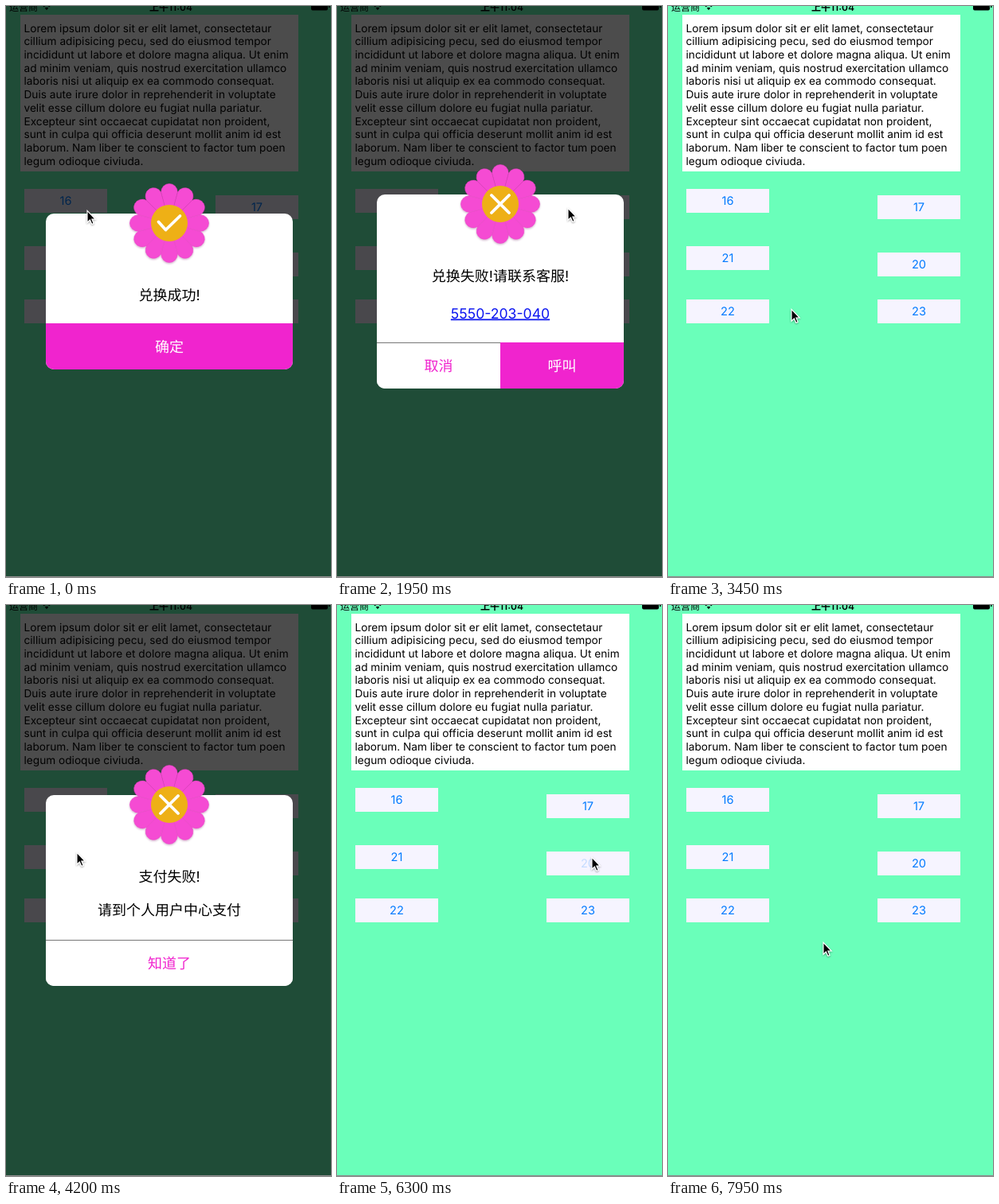
An HTML page that plays this animation: 408x718 px, repeating every 8000 ms.

```html
<!DOCTYPE html>
<html lang="zh-CN">
<head>
<meta charset="utf-8">
<title>弹窗演示</title>
<style>
  html, body { margin: 0; width: 100%; height: 100%; overflow: hidden; background: #6affba; }
  svg { display: block; width: 100vw; height: 100vh; }
  text { font: 18px Inter, "Noto Sans CJK SC", "Noto Sans CJK", sans-serif; text-rendering: geometricPrecision; }
  .mid { text-anchor: middle; }
  #lorem text { font-size: 13.66px; }
  #keys rect { fill: #f6f4ff; }
  #keys text { font-size: 14.6px; fill: #007aff; }
  #keys .tapped text { opacity: .2; }
  #status text { font-size: 12px; }
  #status .clock { font-weight: 600; }
  .dialog { visibility: hidden; }
  .dialog.open { visibility: visible; }
  .solid rect { fill: #f024ce; }
  .solid text { fill: #fff; }
  .plain rect { fill: #fff; }
  .plain text { fill: #f024ce; }
  .plain path { stroke: #777; }
  .pressed rect { filter: brightness(.54); }
  .phone { font-size: 17.6px; fill: #0a14f0; text-decoration: underline; }
</style>
</head>
<body>
<svg viewBox="0 0 408 718" preserveAspectRatio="none">
  <defs>
    <clipPath id="card196"><rect width="310" height="196" rx="10"/></clipPath>
    <clipPath id="card240"><rect width="310" height="240" rx="10"/></clipPath>
    <clipPath id="card244"><rect width="310" height="244" rx="10"/></clipPath>
    <filter id="soft" x="-30%" y="-30%" width="160%" height="160%">
      <feDropShadow dx="0" dy="1.2" stdDeviation=".8" flood-color="#702060" flood-opacity=".35"/>
    </filter>
    <filter id="cursorShadow" x="-50%" y="-50%" width="200%" height="200%">
      <feDropShadow dx="0" dy="1" stdDeviation=".8" flood-opacity=".4"/>
    </filter>
    <g id="flower">
      <g id="petals" fill="#f54bd3" stroke="#e943c6" stroke-width=".5" filter="url(#soft)"></g>
      <circle r="23" fill="#eeb016"/>
    </g>
  </defs>

  <rect width="408" height="718" fill="#6affba"/>
  <g id="status">
    <text x="4" y="5.5">运营商</text>
    <path d="M47 .8Q51 -2.6 55 .8" fill="none" stroke="#000" stroke-width="1.5"/>
    <path d="M48.8 2.6Q51 .8 53.2 2.6L51 5.2Z"/>
    <text class="mid clock" x="207" y="5.5">上午11:04</text>
    <path d="M383 0H404V3.5Q404 5.5 402 5.5H385Q383 5.5 383 3.5ZM405 0H406.5V2H405Z"/>
  </g>
  <rect x="18" y="11" width="349" height="197" fill="#fff"/>
  <g id="lorem"></g>
  <g id="keys"></g>
  <rect id="shade" width="408" height="718" opacity=".7"/>
  <g id="dialogs"></g>
  <rect y="717" width="408" height="1" fill="#8c8c8c"/>
  <path id="cursor" d="M1 1.4V16.2L4.4 13L6.8 18.3L9 17.4L6.8 12H11.2Z" stroke="#fff" stroke-width="1.1" filter="url(#cursorShadow)"/>
</svg>

<script>
const LOOP = 8000, STEP = 150;
const $ = id => document.getElementById(id);

$('petals').innerHTML = Array.from({ length: 12 }, (_, i) =>
  `<path d="M0 0L-10.3 -39A10.3 10.6 0 0 1 10.3 -39Z" transform="rotate(${i * 30})"/>`).join('');

const lorem = `Lorem ipsum dolor sit er elit lamet, consectetaur
cillium adipisicing pecu, sed do eiusmod tempor
incididunt ut labore et dolore magna aliqua. Ut enim
ad minim veniam, quis nostrud exercitation ullamco
laboris nisi ut aliquip ex ea commodo consequat.
Duis aute irure dolor in reprehenderit in voluptate
velit esse cillum dolore eu fugiat nulla pariatur.
Excepteur sint occaecat cupidatat non proident,
sunt in culpa qui officia deserunt mollit anim id est
laborum. Nam liber te conscient to factor tum poen
legum odioque civiuda.`;
$('lorem').innerHTML = lorem.split('\n').map((line, i) =>
  `<text x="22.5" y="${32.6 + i * 16.7}">${line}</text>`).join('');

const keys = [[16, 23, 230], [17, 263, 238], [21, 23, 302], [20, 263, 310], [22, 23, 369], [23, 263, 369]];
$('keys').innerHTML = keys.map(([label, x, y]) =>
  `<g id="key${label}" transform="translate(${x} ${y})"><rect width="104" height="30"/>
   <text class="mid" x="52" y="20.4">${label}</text></g>`).join('');

const marks = {
  check: 'M-13.5 -1.5L-4.5 8.5L13.5 -9',
  cross: 'M-11 -11L11 11M11 -11L-11 11'
};

const button = (kind, label, x, y, width) =>
  `<g class="button ${kind}"><rect x="${x}" y="${y}" width="${width}" height="58"/>
   <path d="M${x} ${y + .5}h${width}"/>
   <text class="mid" x="${x + width / 2}" y="${y + 36}">${label}</text></g>`;

function addDialog({ id, top, height, mark, lines, phone, buttons }) {
  const width = 310 / buttons.length;
  const rows = lines.map((line, i) => `<text class="mid" x="155" y="${108.7 + i * 42.5}">${line}</text>`);
  if (phone) rows.push(`<text class="mid phone" x="155" y="155.5">${phone}</text>`);
  $('dialogs').innerHTML += `<g class="dialog" id="dialog${id}" transform="translate(50 ${top})">
    <g clip-path="url(#card${height})"><rect width="310" height="${height}" fill="#fff"/>
    ${buttons.map(([kind, label], i) => button(kind, label, i * width, height - 58, width)).join('')}</g>
    ${rows.join('')}
    <g transform="translate(155 12)"><use href="#flower"/>
    <path d="${marks[mark]}" fill="none" stroke="#fff" stroke-width="3.8" stroke-linecap="round" stroke-linejoin="round"/></g></g>`;
}

addDialog({ id: 16, top: 261, height: 196, mark: 'check', lines: ['兑换成功!'], buttons: [['solid', '确定']] });
addDialog({ id: 17, top: 237, height: 244, mark: 'cross', lines: ['兑换失败!请联系客服!'],
  phone: '5550-203-040', buttons: [['plain', '取消'], ['solid', '呼叫']] });
addDialog({ id: 21, top: 239, height: 240, mark: 'cross', lines: ['支付失败!', '请到个人用户中心支付'],
  buttons: [['plain', '知道了']] });
addDialog({ id: 20, top: 261, height: 196, mark: 'check', lines: ['支付成功!'], buttons: [['solid', '确定']] });

// Times in ms: key tapped, dialog opened, button pressed, dialog closed.
const scenes = [
  { id: 16, tap: 0, open: 0, press: 750, close: 900 },
  { id: 17, tap: 1800, open: 1950, press: 3000, close: 3450 },
  { id: 21, tap: 4050, open: 4200, press: 5400, close: 5550 },
  { id: 20, tap: 6300, open: 6450, press: 7650, close: 7800 }
].map(scene => ({
  ...scene,
  key: $('key' + scene.id),
  dialog: $('dialog' + scene.id),
  button: document.querySelector(`#dialog${scene.id} .button`)
}));

// Cursor stops: time, x, y.
const stops = [
  [0, 101, 256], [600, 164, 418], [900, 164, 418], [1050, 233, 333], [1500, 289, 253],
  [2250, 289, 253], [2850, 158, 440], [3300, 158, 440], [3450, 154, 380], [3750, 88, 310],
  [4500, 88, 310], [5100, 158, 455], [5550, 158, 455], [6000, 319, 316], [6750, 319, 316],
  [7350, 215, 428], [7800, 215, 428], [7950, 194, 423], [LOOP, 194, 423]
];

function cursorAt(time) {
  const next = stops.findIndex(stop => stop[0] > time);
  const [t0, x0, y0] = stops[next - 1], [t1, x1, y1] = stops[next];
  const p = (time - t0) / (t1 - t0), ease = p * p * (3 - 2 * p);
  return [x0 + (x1 - x0) * ease, y0 + (y1 - y0) * ease].map(Math.round);
}

function render(now) {
  const time = Math.floor((now % LOOP) / STEP) * STEP;
  let shaded = false;
  for (const { key, dialog, button, tap, open, press, close } of scenes) {
    const isOpen = time >= open && time < close;
    shaded ||= isOpen;
    key.classList.toggle('tapped', time >= tap && time < open);
    dialog.classList.toggle('open', isOpen);
    button.classList.toggle('pressed', isOpen && time >= press);
  }
  $('shade').style.visibility = shaded ? 'visible' : 'hidden';
  $('cursor').setAttribute('transform', `translate(${cursorAt(time).join(' ')})`);
}

const start = performance.now();
function tick() {
  render(performance.now() - start);
  requestAnimationFrame(tick);
}
tick();
</script>
</body>
</html>
```
